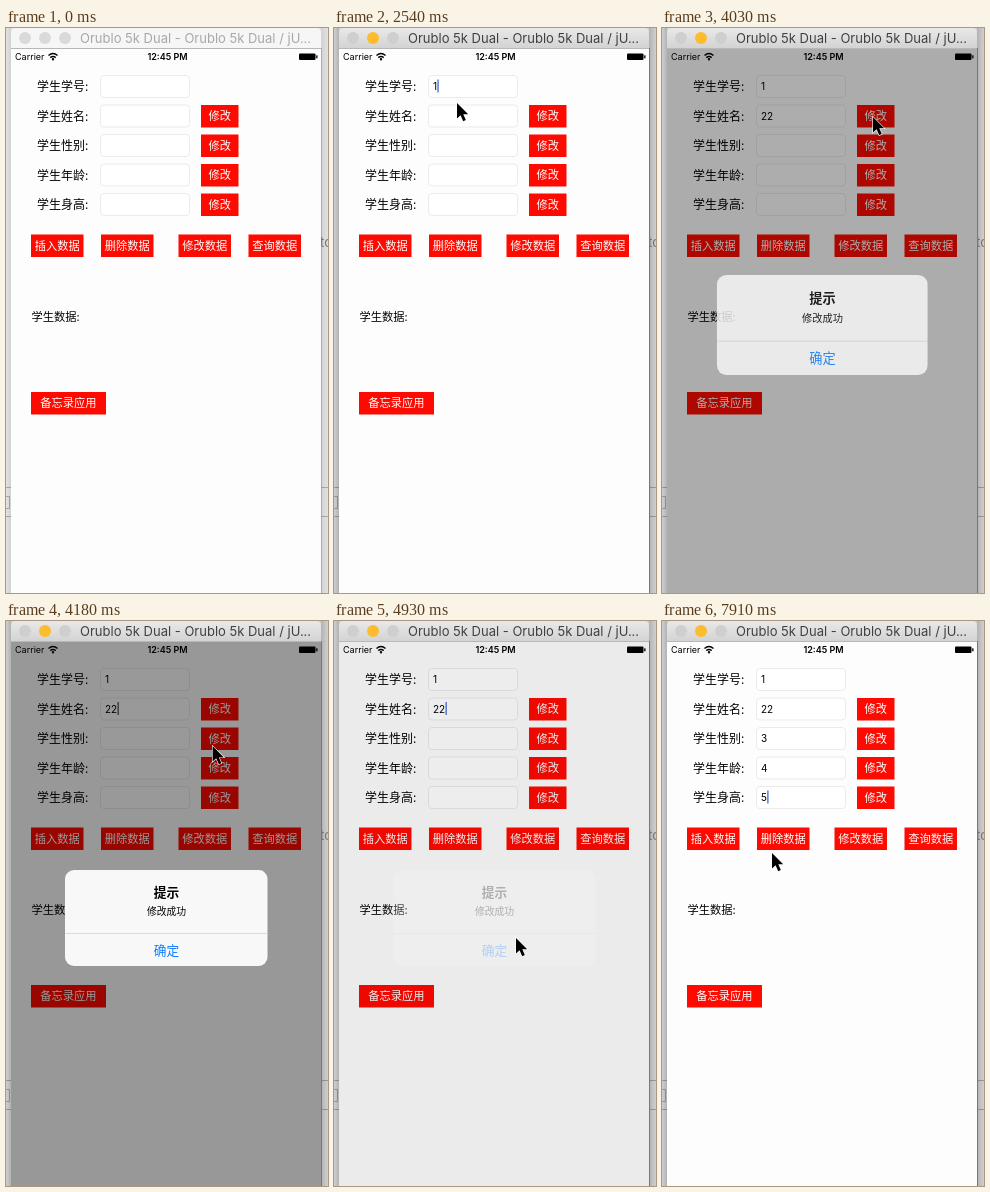
These frames come from a looping animation (322x565 px, 8000 ms). An HTML page:

```html
<!DOCTYPE html>
<html lang="zh-CN">
<head>
<meta charset="utf-8">
<style>
  html, body { margin: 0; width: 322px; height: 565px; overflow: hidden; background: #ccc; }
  svg { display: block; font-family: "Noto Sans CJK SC", "Noto Sans CJK", sans-serif; }
  .latin { font-family: Inter, Roboto, sans-serif; }
  .mid { text-anchor: middle; }
</style>
</head>
<body>
<svg id="stage" width="322" height="565" viewBox="0 0 322 565">
  <defs>
    <linearGradient id="bar" x2="0" y2="1">
      <stop stop-color="#e9e9e9"/><stop offset="1" stop-color="#d2d2d2"/>
    </linearGradient>
    <linearGradient id="shade">
      <stop stop-color="#000" stop-opacity="0"/><stop offset="1" stop-color="#000" stop-opacity=".14"/>
    </linearGradient>
  </defs>

  <rect id="desk" width="322" height="565"/>
  <g stroke="#000" stroke-opacity=".25" fill="none">
    <path d="M0 459.5H322M0 488.5H322"/>
    <path d="M0 468.5H3.5V480.5H0"/>
  </g>
  <text class="latin" x="314" y="219" font-size="13" fill="#777">tc</text>
  <g id="shadow">
    <rect width="5" height="565" fill="url(#shade)"/>
    <rect width="7" height="565" fill="url(#shade)" transform="matrix(-1 0 0 1 322 0)"/>
    <path d="M315.5 20V565" stroke="#777"/>
  </g>

  <path id="titlebar" d="M5 21V5Q5 0 10 0H310Q315 0 315 5V21Z"/>
  <path d="M5 20.5H315" stroke="#b8b8b8"/>
  <g id="lights"></g>
  <text id="title" class="latin" x="74" y="15" font-size="13">Orublo 5k Dual - Orublo 5k Dual / jU...</text>

  <rect x="5" y="21" width="310" height="544" fill="#fdfdfd"/>
  <g class="latin" font-size="9">
    <text x="9" y="32">Carrier</text>
    <text class="mid" x="161.5" y="32" font-weight="600">12:45 PM</text>
  </g>
  <g fill="none" stroke="#000" stroke-width="1.4">
    <path d="M42.5 27.6Q47 23.6 51.5 27.6M44.3 29.6Q47 27.3 49.7 29.6"/>
    <circle cx="47" cy="31.2" r=".5"/>
  </g>
  <rect x="293" y="25.5" width="16.5" height="6.5" rx="1"/>
  <rect x="310.2" y="27.3" width="1.3" height="3"/>
  <g id="form"></g>
  <text x="25.5" y="293" font-size="11.25">学生数据:</text>

  <rect id="caret" width="1.3" height="13"/>
  <rect id="dim" x="5" y="21" width="310" height="544"/>
  <g id="alert" class="mid">
    <rect x="59" y="249" width="202.500" height="96" rx="9" fill="#f8f8f8"/>
    <path d="M59 312.500H261.500" stroke="#d6d6d8" stroke-width=".8"/>
    <text x="160.500" y="276" font-size="12.700" font-weight="700">提示</text>
    <text x="160.500" y="294.300" font-size="9.800">修改成功</text>
    <text x="160.500" y="333.700" font-size="12.700" fill="#0a7cff">确定</text>
  </g>
  <path id="cursor" d="M0 0V15.500L3.600 12.200 6.200 18.200 8.800 17.100 6.300 11.300H11.200Z"
        stroke="#fff" stroke-width="1.200" paint-order="stroke"/>
</svg>

<script>
const $ = id => document.getElementById(id);

function add(parent, tag, attrs, text = "") {
  const el = document.createElementNS("http://www.w3.org/2000/svg", tag);
  set(el, attrs);
  el.textContent = text;
  parent.append(el);
  return el;
}

function set(el, attrs) {
  for (const k in attrs) el.setAttribute(k, attrs[k]);
}

function button(x, y, w, label) {
  add($("form"), "rect", { x, y, width: w, height: 22.5, fill: "#ff0a00" });
  add($("form"), "text", { class: "mid", x: x + w / 2, y: y + 15.4, "font-size": 11.25, fill: "#fff" }, label);
}

const rowY = i => 47.5 + i * 29.5;
const lights = [19, 39, 59].map(cx => add($("lights"), "circle", { cx, cy: 10, r: 6 }));

const values = ["学号", "姓名", "性别", "年龄", "身高"].map((name, i) => {
  const y = rowY(i);
  add($("form"), "text", { x: 31, y: y + 15.8, "font-size": 12 }, `学生${name}:`);
  add($("form"), "rect", { x: 94.5, y, width: 89, height: 22, rx: 3.5, fill: "#fff", stroke: "#ebebeb" });
  if (i) button(195, y, 37.5, "修改");
  return add($("form"), "text", { class: "latin", x: 99, y: y + 14.8, "font-size": 10 });
});
[["插入数据", 25], ["删除数据", 95], ["修改数据", 172.5], ["查询数据", 242.5]]
  .forEach(([label, x]) => button(x, 206.5, 52.5, label));
button(25, 364, 75, "备忘录应用");

const LOOP = 8000, TICK = 149.2;
const path = [
  [3, 195, 124], [8, 110, 51], [13, 110, 51], [17, 123, 75], [19, 132, 81], [22, 132, 81],
  [25, 211, 89], [27, 211, 89], [31, 183, 320], [32, 183, 320], [33, 182, 317],
  [34, 122, 153], [37, 115, 114], [40, 115, 114], [42, 114, 143], [44, 114, 143],
  [48, 111, 173], [50, 110, 173], [53, 110, 232]
];
const typed = [[13, 0, "1"], [21, 1, "2"], [22, 1, "22"], [40, 2, "3"], [44, 3, "4"], [51, 4, "5"]];
const focus = [[11, 0], [20, 1], [39, 2], [44, 3], [50, 4]];
// start, opacity, scale, dimming
const alertStates = [[0, 0, 1, 0], [26, .45, 1.12, .15], [27, .82, 1.04, .32],
  [28, 1, 1, .4], [33, .25, 1, .07], [34, 0, 1, 0]];

const latest = (list, n) => list.filter(s => s[0] <= n).pop();

function cursorAt(n) {
  const i = path.findIndex(p => p[0] >= n);
  if (i < 0) return path[path.length - 1].slice(1);
  if (i === 0) return path[0].slice(1);
  const [a, b] = [path[i - 1], path[i]];
  const u = (n - a[0]) / (b[0] - a[0]), e = u * u * (3 - 2 * u);
  return [1, 2].map(k => a[k] + (b[k] - a[k]) * e);
}

function draw(n) {
  const active = n >= 2;
  set($("desk"), { fill: active ? "#cfcfcf" : "#e2e2e2" });
  set($("shadow"), { opacity: active ? 1 : .5 });
  set($("titlebar"), { fill: active ? "url(#bar)" : "#f6f6f6" });
  set($("title"), { fill: active ? "#404040" : "#a8a8a8" });
  lights.forEach((l, i) => set(l, { fill: !active ? "#dadada" : i === 1 ? "#fdbc2e" : "#cfcfcf" }));

  values.forEach((v, i) => {
    const entry = latest(typed.filter(s => s[1] === i), n);
    v.textContent = entry ? entry[2] : "";
  });

  const [, opacity, scale, dim] = latest(alertStates, n);
  const field = latest(focus, n);
  const blinkOff = n === 26 || n === 27 || (n > 35 && n < 39);
  set($("caret"), { opacity: field && !blinkOff ? 1 : 0, fill: n > 25 && n < 33 ? "#555" : "#4468d8" });
  if (field) {
    const row = field[1];
    set($("caret"), { x: 99.3 + values[row].getComputedTextLength(), y: rowY(row) + 4 });
  }

  set($("dim"), { opacity: dim });
  set($("alert"), { opacity, transform: `translate(160.25 297) scale(${scale}) translate(-160.25 -297)` });
  set($("cursor"), { opacity: active ? 1 : 0, transform: `translate(${cursorAt(n)})` });
}

function loop(now) {
  draw(Math.floor((now % LOOP + 4) / TICK));
  requestAnimationFrame(loop);
}
requestAnimationFrame(loop);
</script>
</body>
</html>
```
